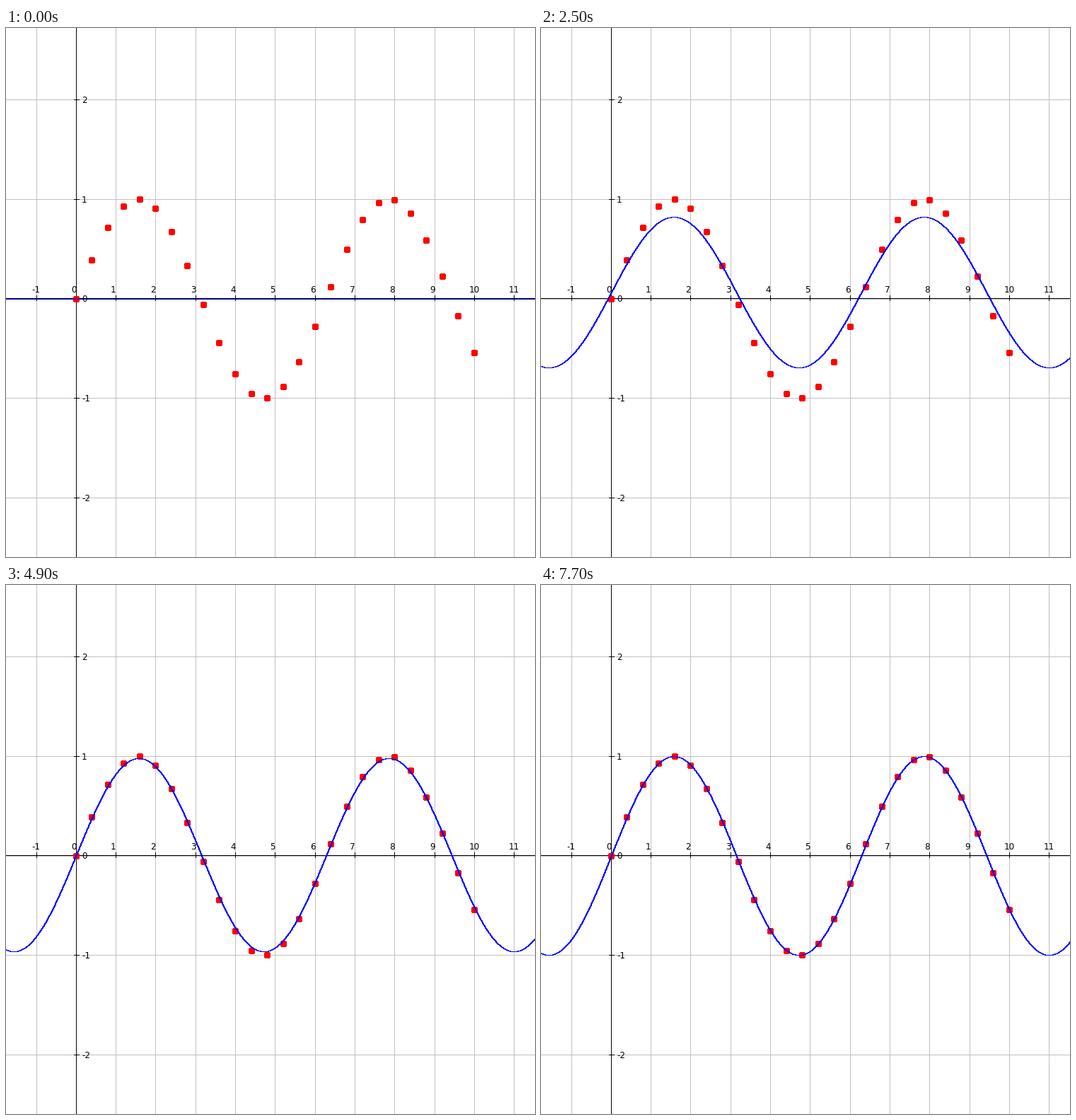
Write a matplotlib script that moves like this. It is 748 px wide and 748 px high and loops after 7800 ms.

```python
import math

import matplotlib
matplotlib.rcParams["toolbar"] = "None"
import matplotlib.pyplot as plt
import numpy as np
from matplotlib.animation import FuncAnimation
from matplotlib.patches import Circle, Rectangle

SIZE = 748
STEP_MS = 100
LOOP_MS = 7800
X0, X_UNIT = 99.3, 56.3
Y0, Y_UNIT = 383.2, 140.7
AXIS_COL, AXIS_ROW = 99, 382
GRID = "#c0c0c0"
RATE = 0.5

# times (ms) at which the fitted curve moves, and the descent step reached
CHANGES = [(500, 0)]
for n in range(1, 10):
    CHANGES += [(400 + 500 * n, 2 * n - 1), (500 + 500 * n, 2 * n)]
CHANGES += [(5400, 20), (5900, 22), (6300, 23), (6600, 24), (6700, 25),
            (7000, 26), (7100, 27), (7600, 29), (7700, 30)]

fig = plt.figure(figsize=(SIZE / 72, SIZE / 72), dpi=72, facecolor="white")
ax = fig.add_axes([0, 0, 1, 1])
ax.set_xlim(0, SIZE)
ax.set_ylim(SIZE, 0)
ax.axis("off")


def column(x):
    return math.floor(X0 + X_UNIT * x)


def row(y):
    return math.floor(Y0 - 0.3 - Y_UNIT * y)


def bar(x, y, w, h, color, z):
    ax.add_patch(Rectangle((x, y), w, h, fc=color, ec="none", lw=0,
                           antialiased=False, zorder=z))


def label(x, y, value):
    ax.text(x, y, str(value), fontsize=12, family="DejaVu Sans",
            color="black", ha="left", va="baseline", zorder=3)


def draw_plane():
    for x in range(-1, 12):
        c = column(x)
        bar(c, 0, 1, SIZE, GRID, 1)
        bar(c, AXIS_ROW - 4, 1, 8, "black", 2)
        label(c - 7, 374, x)
    for y in range(-2, 3):
        r = row(y) if y else AXIS_ROW
        bar(0, r + (y == 0), SIZE, 1, GRID, 1)
        bar(AXIS_COL - 3, r, 8, 1, "black", 2)
        label(107, r + 5, y)
    bar(AXIS_COL, 0, 1, SIZE, "black", 2)
    bar(0, AXIS_ROW, SIZE, 1, "black", 2)


def draw_samples(xs):
    for x in xs:
        cx = column(x) + 0.5
        cy = math.floor(Y0 - Y_UNIT * math.sin(x)) + 0.5
        ax.add_patch(Circle((cx, cy), 4.5, fc="red", ec="none", lw=0,
                            antialiased=False, zorder=4))


def descend(xs, steps):
    """Fit a*sin(x) + b to sin(x) by gradient descent from (-1, -1)."""
    s = np.sin(xs)
    a, b = -1.0, -1.0
    path = [(a, b)]
    for _ in range(steps):
        error = a * s + b - s
        a, b = a - RATE * np.mean(error * s), b - RATE * np.mean(error)
        path.append((a, b))
    return path


samples = np.arange(26) * 0.4
fits = descend(samples, 30)
draw_plane()
draw_samples(samples)

cols = np.arange(-1, SIZE + 1)
wave = np.sin((cols - X0) / X_UNIT)
curve, = ax.plot([], [], color="blue", lw=1, antialiased=False,
                 snap=False, zorder=5)


def update(frame):
    a, b = 0.0, 0.0
    for start, step in CHANGES:
        if frame * STEP_MS >= start:
            a, b = fits[step]
    rows = np.floor(Y0 - Y_UNIT * (a * wave + b))
    curve.set_data(cols + 0.5, rows + 0.5)
    return curve,


anim = FuncAnimation(fig, update, frames=LOOP_MS // STEP_MS,
                     interval=STEP_MS, repeat=True, repeat_delay=0, blit=False)
plt.show()
```
